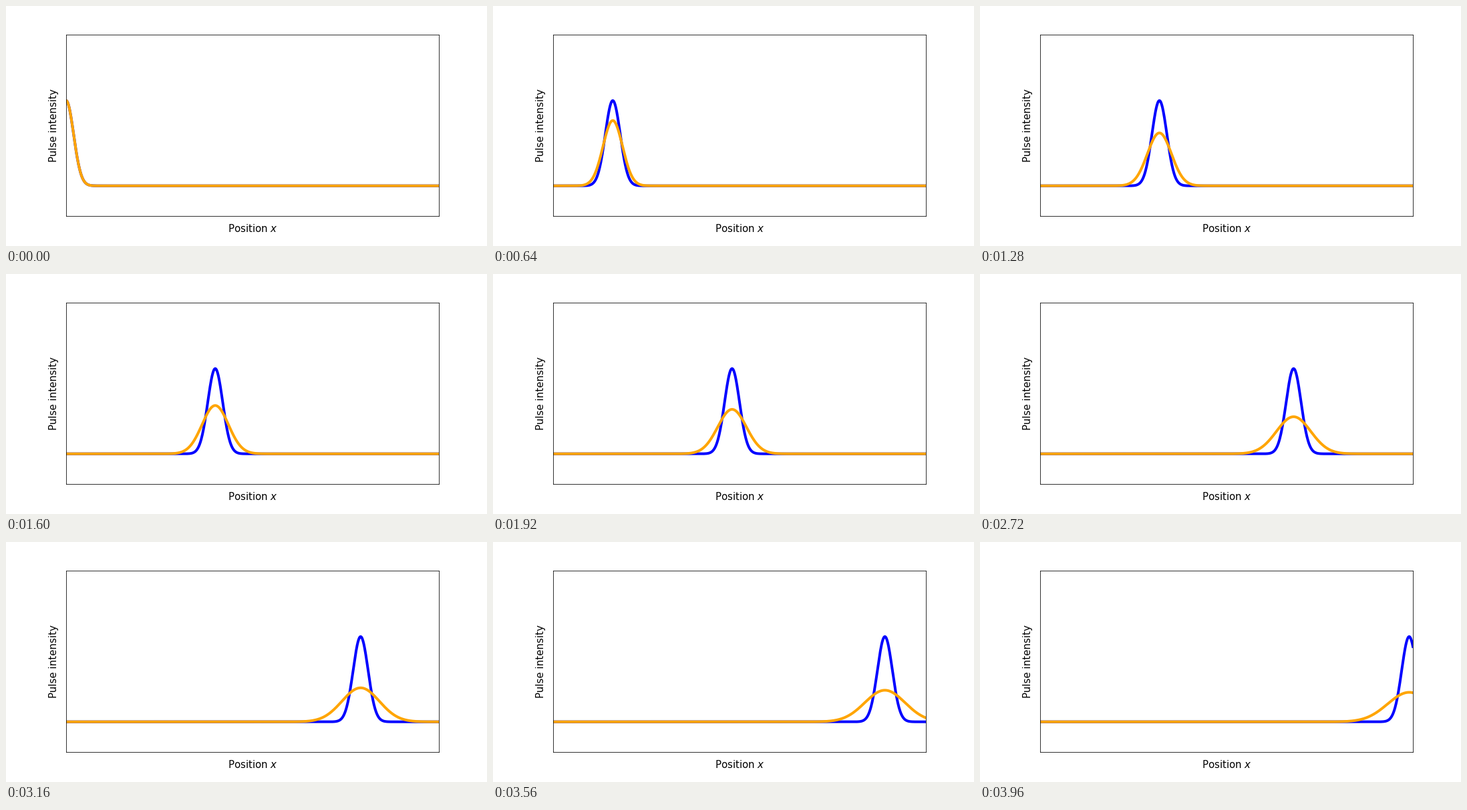
Recreate the animation shown at these times as a matplotlib script. Size 720 by 360 pixels, loop 4000 ms.

```python
import numpy as np
import matplotlib.pyplot as plt
from matplotlib.animation import FuncAnimation

FRAMES = 100
STEP = 0.1        # distance travelled per frame
SIGMA = 0.2       # initial pulse width
SPREAD = 0.0191   # relative broadening per frame

plt.rcParams["font.family"] = "DejaVu Sans"

fig, ax = plt.subplots(figsize=(10, 5), dpi=72, facecolor="white")
fig.subplots_adjust(left=0.125, right=0.9, bottom=0.125, top=0.88)
ax.set(xlim=(0, 10), ylim=(-0.5, 2.5), xticks=[], yticks=[])
ax.set_xlabel("Position $x$", fontsize=15, labelpad=11)
ax.set_ylabel("Pulse intensity", fontsize=15, labelpad=11)

x = np.linspace(0, 10, 1000)
steady, = ax.plot([], [], color="blue", lw=4)
spreading, = ax.plot([], [], color="orange", lw=4)


def pulse(center, sigma):
    """Gaussian whose area does not depend on its width."""
    return np.exp(-((x - center) / sigma) ** 2 / 2) / (2 * np.sqrt(np.pi) * sigma)


def update(n):
    center = STEP * n
    steady.set_data(x, pulse(center, SIGMA))
    spreading.set_data(x, pulse(center, SIGMA * (1 + SPREAD * n)))
    return steady, spreading


anim = FuncAnimation(fig, update, frames=FRAMES, interval=40,
                     repeat=True, repeat_delay=0, blit=False)
plt.show()
```
